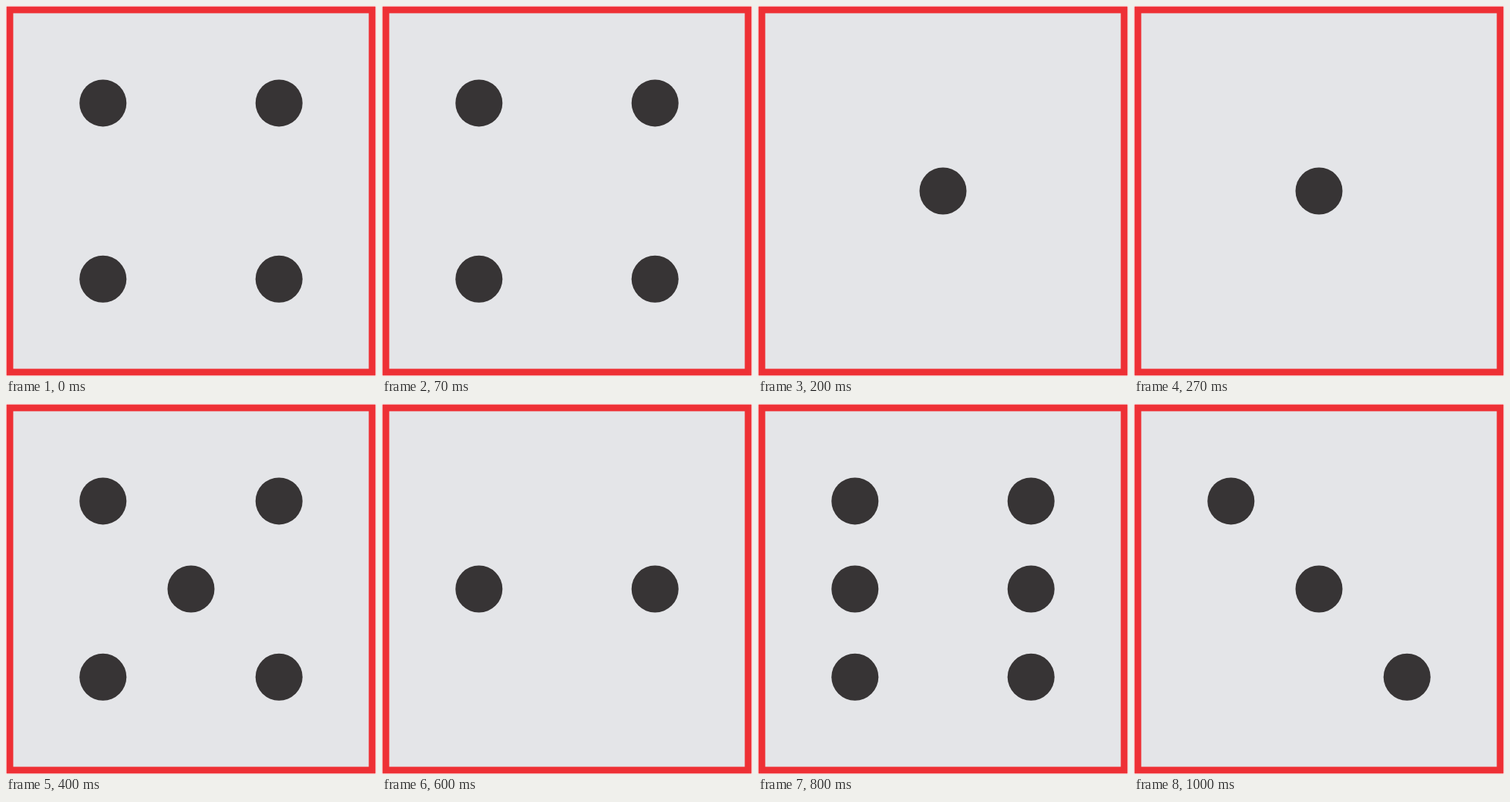
An HTML page without scripts for the animation above (1190 ms loop, 480x480 px).

```html
<!DOCTYPE html>
<html lang="en">
<head>
<meta charset="utf-8">
<title>Rolling die</title>
<style>
  html, body { margin: 0; width: 100%; height: 100%; overflow: hidden; background: #fff; }
  svg { display: block; width: 100%; height: 100%; }
  .face { fill: #e4e5e8; stroke: #ee3035; stroke-width: 8.8; }
  .pips { fill: #373435; }
  .pips g { animation: 1190ms step-end infinite; }

  /* The die shows 4, 1, 5, 2, 6, 3, each for about 200 ms. */
  .pips .fall { animation-name: fall; }
  .pips .rise { animation-name: rise; }
  .pips .center { animation-name: center; }
  .pips .sides { animation-name: sides; }

  @keyframes fall {
    0%, 33.613%, 67.226%, 100% { opacity: 1; }
    16.806%, 50.42% { opacity: 0; }
  }
  @keyframes rise {
    0%, 33.613%, 67.226% { opacity: 1; }
    16.806%, 50.42%, 84.033%, 100% { opacity: 0; }
  }
  @keyframes center {
    0%, 50.42% { opacity: 0; }
    16.806%, 84.033%, 100% { opacity: 1; }
  }
  @keyframes sides {
    0%, 84.033%, 100% { opacity: 0; }
    50.42% { opacity: 1; }
  }
</style>
</head>
<body>
<svg viewBox="0 0 480 480">
  <defs><circle id="pip" r="30.5"/></defs>
  <rect class="face" x="5" y="5" width="470" height="470"/>
  <g class="pips">
    <g class="fall"><use href="#pip" x="125.8" y="125.9"/><use href="#pip" x="354.2" y="354.2"/></g>
    <g class="rise"><use href="#pip" x="354.2" y="125.9"/><use href="#pip" x="125.8" y="354.2"/></g>
    <g class="center"><use href="#pip" x="240" y="240"/></g>
    <g class="sides"><use href="#pip" x="125.8" y="240"/><use href="#pip" x="354.2" y="240"/></g>
  </g>
</svg>
</body>
</html>
```
